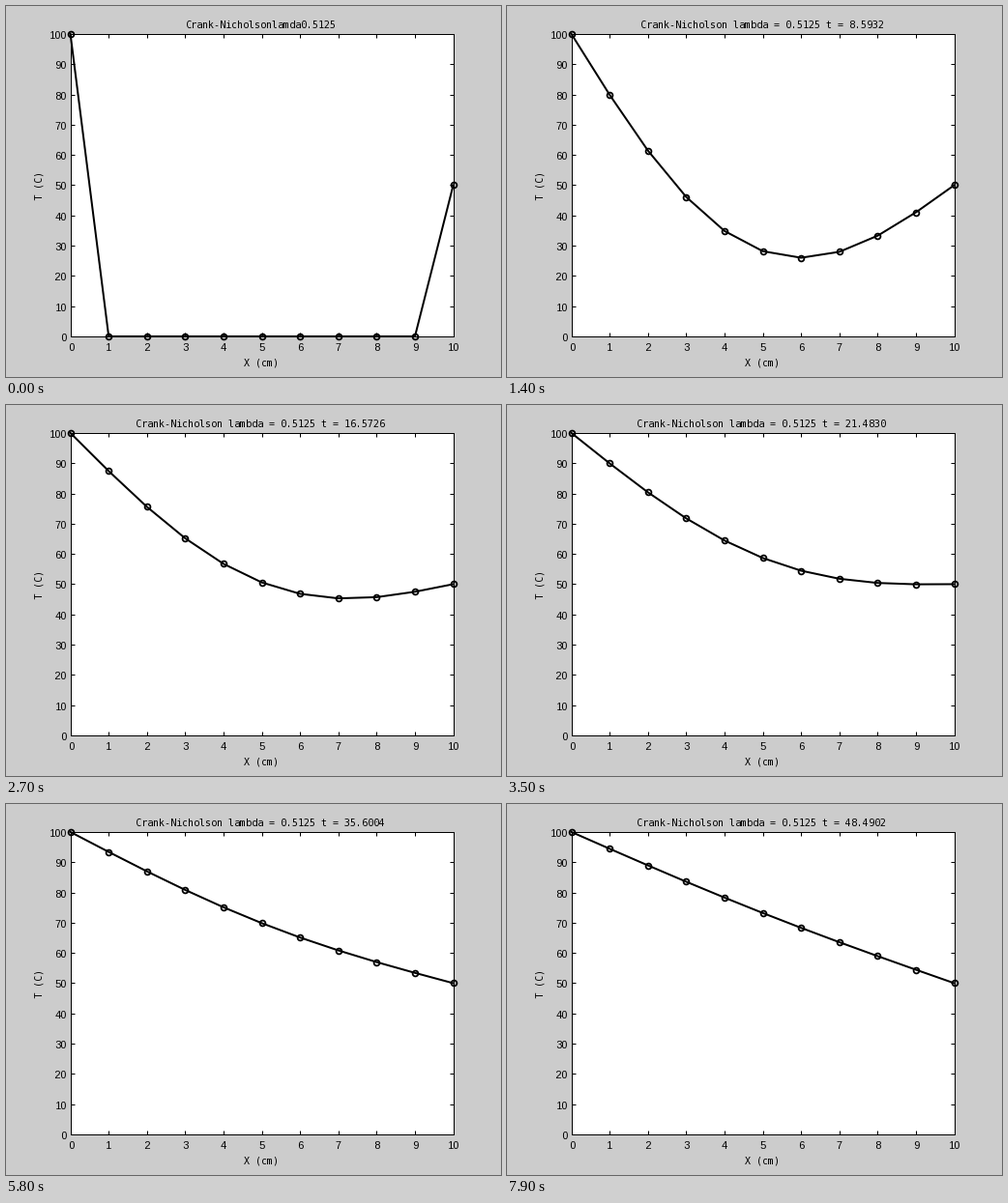
A matplotlib script for the animation above (8000 ms loop, 512 px wide and 384 px high).

```python
import numpy as np
import matplotlib.pyplot as plt
from matplotlib.animation import FuncAnimation

plt.rcParams.update({
    "toolbar": "None",
    "text.hinting": "force_autohint",
    "text.hinting_factor": 1,
})

W, H = 512, 384
# Just below whole pixels, so that ticks and markers snap downwards.
LEFT, RIGHT, TOP, BOTTOM = 66.6, 462.6, 28.95, 341.95
STEPS = 80
LAMBDA, DT = 0.5125, 0.6138
MONO = dict(family="DejaVu Sans Mono", size=10.3)
DIGITS = dict(family="Liberation Sans", size=11)


def crank_nicolson(steps, nodes=11, hot=100.0, warm=50.0):
    """Temperatures of a rod held at fixed end values, one row per step."""
    temp = np.zeros(nodes)
    temp[0], temp[-1] = hot, warm
    second = np.zeros((nodes, nodes))
    for i in range(1, nodes - 1):
        second[i, i - 1:i + 2] = 1, -2, 1
    half = LAMBDA / 2 * second
    advance = np.linalg.solve(np.eye(nodes) - half, np.eye(nodes) + half)
    rows = [temp]
    for _ in range(steps - 1):
        rows.append(advance @ rows[-1])
    return rows


fig = plt.figure(figsize=(W / 72, H / 72), dpi=72, facecolor="#cccccc")
ax = fig.add_axes([LEFT / W, 1 - BOTTOM / H,
                   (RIGHT - LEFT) / W, (BOTTOM - TOP) / H])
ax.set(xlim=(0, 10), ylim=(0, 100),
       xticks=range(11), yticks=range(0, 101, 10))
ax.tick_params(direction="in", length=4, width=1, top=True, right=True,
               labelbottom=False, labelleft=False)
for spine in ax.spines.values():
    spine.set_linewidth(1)


def label(x, y, text, font, ha="center", va="baseline", **kw):
    return fig.text(x / W, 1 - y / H, text, ha=ha, va=va, **font, **kw)


for i in range(11):
    label(LEFT + i * (RIGHT - LEFT) / 10, 357, str(i), DIGITS)
    label(62.5, BOTTOM - i * (BOTTOM - TOP) / 10 + 5, str(10 * i),
          DIGITS, ha="right")
label(263.5, 372, "X (cm)", MONO)
label(34.5, 186, "T (C)", MONO, va="center", rotation=90)
title = label(263.5, 23, "", MONO)

curve, = ax.plot([], [], "-o", color="black", lw=2, ms=5.8, mew=1.8,
                 mfc="none", clip_on=False, zorder=5)
profiles = crank_nicolson(STEPS)
nodes = np.arange(11)


def update(n):
    curve.set_data(nodes, profiles[n])
    if n == 0:
        title.set_text(f"Crank-Nicholsonlamda{LAMBDA}")
    else:
        title.set_text(f"Crank-Nicholson lambda = {LAMBDA} t = {n * DT:.4f}")
    return curve, title


anim = FuncAnimation(fig, update, frames=STEPS, interval=100,
                     repeat=True, repeat_delay=0)
plt.show()
```
